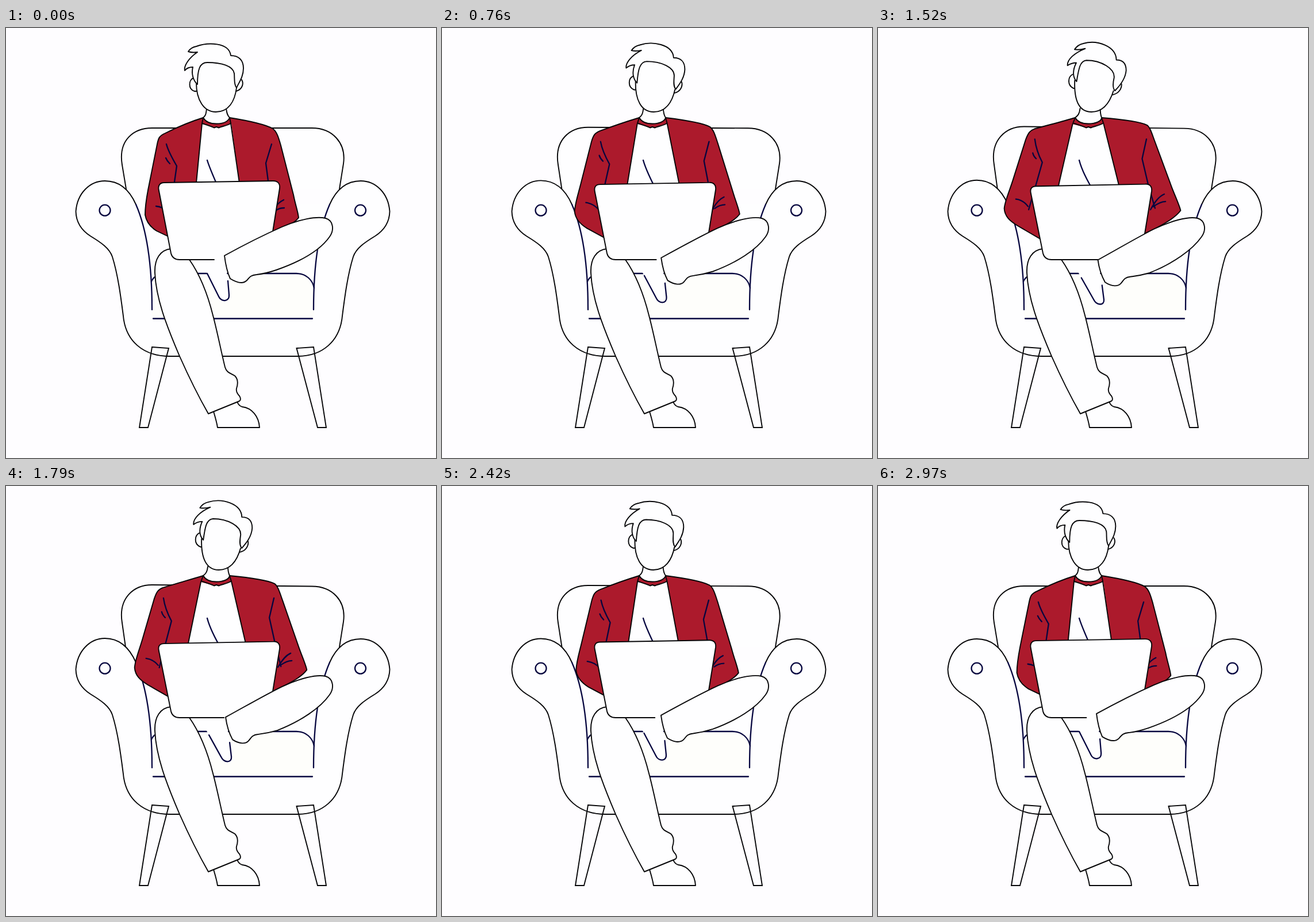
Recreate the animation shown at these times as an HTML page. Size 748 by 748 pixels, loop 3000 ms.

```html
<!DOCTYPE html>
<html lang="en">
<head>
<meta charset="utf-8">
<title>Man with laptop</title>
<style>
html, body { margin: 0; height: 100%; overflow: hidden; background: #fefdff; }
svg { display: block; width: 100vw; height: 100vh; stroke-linecap: round; stroke-linejoin: round; }
path { fill: none; stroke: none; stroke-width: 1.9; }
.ink { stroke: #060608; }
.navy { stroke: #06063f; stroke-width: 2.3; }
.white { fill: #fefeff; }
.cushion { fill: #fefefb; }
.red { fill: #ac1a2c; }
.sharp { stroke-linejoin: miter; }
</style>
</head>
<body>
<svg id="stage" viewBox="0 0 748 748"></svg>
<script>
const stage = document.getElementById('stage');
const moving = [];

// A second path is the leaned-back pose, with the same commands as the first.
function draw(cls, rest, lean) {
  const el = document.createElementNS('http://www.w3.org/2000/svg', 'path');
  el.setAttribute('class', cls);
  el.setAttribute('d', rest);
  stage.append(el);
  if (lean) moving.push({ el, rest, to: lean.match(/-?[\d.]+/g).map(Number) });
}

// Armchair
draw('ink white',
  'M209,280 L202,238 C195,195 222,174 254,174 L532,174 C568,174 592,200 587,236 L580,280',
  'M208,280 L202,238 C195,195 222,172 254,172 L532,174.5 C568,174.5 592,200 587,236 L580,280');
const body = y => `M226,307 C215,282 198,${y} 172,${y} C146,${y} 124,287 121.5,319
  C122,340 133,353 147,362 C165,373 180,383 185,398 C195,430 200,470 204,501
  C208,544 238,571 285,571 L507,571 C551,571 581,544 585,501 C589,470 594,430 604,398
  C609,383 624,373 642,362 C656,353 667,340 667.5,319 C665,287 643,266 617,266 C591,266 574,282 563,307`;
draw('ink white', body(266), body(265));
draw('cushion', 'M254,505 V441 C256,432 268,427 280,427 H505 C522,427 533,438 536,452 V505');
draw('navy', 'M253,441 C256,432 268,427 280,427 H505 C522,427 533,438 536,452');
draw('navy', 'M256,505.5 H533');
draw('navy', 'M226,307 C247,355 254,420 254,490 M563,307 C542,355 535,420 535,490');
const button = x => `M${x - 9.5},317.2 a9.5,9.5 0 1 1 19,0 a9.5,9.5 0 1 1 -19,0`;
draw('navy', button(172) + button(616.5));
draw('ink sharp', 'M254,555 L283,557 L247,695 H232 Z M505.5,557 L535,555 L557,695 H542 Z');

// Jacket and shirt
draw('ink red',
  'M343,156 C320,163 295,174 277,183 C266,188 265,192 263,202 L247,282 C244,298 242,310 242,325 C244,337 251,346 262,353 L281,362 L464,354 C480,349 500,342 509,330 C508,320 503,306 500,290 L478,204 C474,190 471,180 464,175 C450,167 420,161 389,156',
  'M343,156 C320,163 295,170 273,177 C265,180 262,184 258,196 L238,265 C232,286 225,302 224,316 C225,330 234,338 247,346 L282,366 L464,357 C484,348 512,335 523,320 C522,313 515,297 509,280 L481,199 C476,185 473,174 467,170 C455,164 420,159 389,156');
draw('white',
  'M341,166 L362,173 L366,172 L370,173 L392,166 L406,270 L331,270 Z',
  'M339,167 L362,173 L366,172 L370,173 L392,166 L417,275 L317,275 Z');
draw('ink',
  'M343,156 L341,166 L331,270 M389,156 L391,166 L406,270',
  'M343,156 L339,167 L317,275 M389,156 L392,166 L417,275');
draw('ink', 'M341,166 C350,169 357,171 362,173.5 L366,172 L370,173.5 C376,171 384,170 391,166');
draw('navy',
  'M350,230 C354,243 360,256 365,268',
  'M350,230 C354,245 361,259 368,272');
draw('navy',
  'M279,202 C282,214 290,228 297,240 L293,268 L287,316 M278,226 C280,231 282,233 285,236 M261,310 C270,311 276,314 282,319',
  'M274,195 C276,209 281,222 288,235 L278,273 L267,316 M271,219 C272,224 274,226 277,229 M244,300 C253,301 260,306 265,312');
draw('navy',
  'M462,202 L452,235 L456,266 L462,316 M483,299 C477,302 473,305 469,311 M484,313 C478,313 474,314 470,317',
  'M466,195 L458,229 L467,270 L478,314 M495,291 C486,295 480,303 473,315 M497,304 C490,304 484,307 477,312');

// Neck and head
draw('ink white',
  'M349,140 C348,150 347,153 343,156 C347,163 356,166.5 366,166.5 C377,166.5 386,163 389,156 C385,152 384,148 383,140',
  'M351,140 C350,150 347,153 343,156 C347,163 356,166.5 366,166.5 C377,166.5 388,163 389,156 C387,152 386,148 386,140');
draw('ink white',
  'M326,87 C318,90 316,106 328,110 L332,110 M410,90 C414,97 411,107 400,110',
  'M336,82 C328,86 326,101 338,106 L341,106 M421,96 C422,103 418,113 406,115');
draw('ink white',
  'M331,95 C331,125 344,146 365,146 C387,146 398,128 401,104',
  'M340,92 C339,125 348,146 370,146 C390,146 402,130 408,108');
draw('white',
  'M333,98 L340,62 L390,64 L401,104 Z',
  'M343,94 L350,60 L400,68 L410,108 Z');
draw('ink white',
  'M333,98 C326,92 322,80 325,68 C319,68 314,70 311,74 C309,66 318,52 333,42 C326,43 320,42 317,41 C320,36 326,33 331,32 C350,25 388,24 391,48 C405,48 413,56 413,70 C413,85 405,95 401,104 C396,98 398,88 397,79 C395,66 375,60 350,60 C337,60 333,72 333,98',
  'M343,94 C336,87 335,75 341,62 C335,62 330,64 326,67 C325,57 337,45 355,37 C347,39 342,39 337,38 C341,32 347,29 352,28 C375,21 409,30 410,54 C423,54 428,62 428,73 C427,88 418,99 410,108 C405,103 407,92 408,85 C409,70 386,57 360,57 C348,58 346,72 343,94');

// Standing leg and shoe
draw('ink white', 'M402,650 C404,655 407,658 411,659 C428,661 440,676 441,695 H368 C367,688 364,677 361,667');
draw('white',
  'M336,403 L350,427 L370,467 C374,476 389,477 388,464 L386,440 L380,396 Z',
  'M336,403 L353,433 L374,471 C379,482 393,482 392,471 L389,446 L382,402 Z');
draw('navy',
  'M350,427 L370,467 C374,477 389,477 388,464 L386,440',
  'M353,433 L374,471 C379,482 393,482 392,471 L389,446');
draw('ink white', `M287,384 C268,386 258,402 259,426 C261,470 278,515 302,571 C318,607 336,643 352,671
  L406,649 C409,647 408,643 406,640 C402,636 400,632 401,627 C404,618 404,611 398,605
  C390,600 384,600 381,590 C374,562 368,530 360,500 C352,468 338,430 319,403`);

// Laptop and crossed leg
draw('ink white',
  'M362,403 L302,403 C294,403 289,400 287,392 L266,283 C264,275 267,269 275,269 L465,266 C473,266 477,271 476,279 L464,354',
  'M379,403 L302,403 C294,403 289,400 287,392 L266,287 C264,279 267,274 275,274 L465,270.5 C473,270 477,275 476,283 L464,357');
draw('ink white',
  'M380,396 C420,374 455,357 480,346 C510,333 540,327 556,331 C570,335 571,352 563,363 C547,386 513,406 470,421 C455,426 445,428 436,429 C424,430 423,435 419,439 C413,445 403,444 390,436 C385,425 382,412 380,396 Z',
  'M382,402 C422,380 455,361 480,349 C510,335 540,327 556,331 C570,335 571,352 563,363 C547,386 513,409 472,425 C455,430 445,431 438,432 C427,433 426,439 422,443 C417,449 406,449 394,441 C388,430 384,417 382,402 Z');

const PERIOD = 3000, TURN = 1515, REACH = 1.25;

function frame(now) {
  const t = now % PERIOD;
  const k = REACH * (t < TURN ? t / TURN : (PERIOD - t) / (PERIOD - TURN));
  for (const { el, rest, to } of moving) {
    let i = 0;
    el.setAttribute('d', rest.replace(/-?[\d.]+/g, n => (+n + (to[i++] - n) * k).toFixed(2)));
  }
  requestAnimationFrame(frame);
}
requestAnimationFrame(frame);
</script>
</body>
</html>
```
